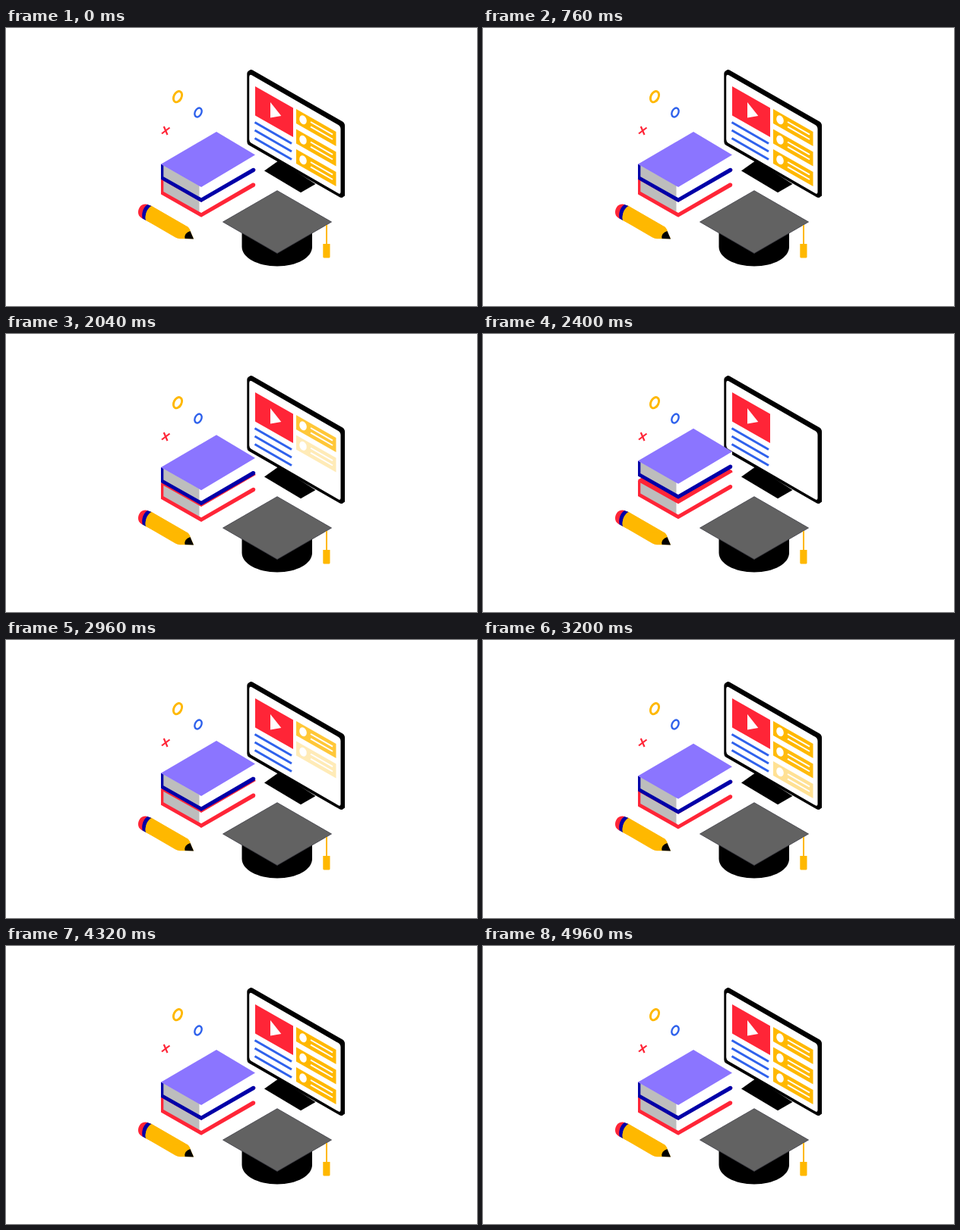
An HTML page for the animation above (5 s loop, 620x367 px).

```html
<!DOCTYPE html>
<html lang="en">
<head>
<meta charset="utf-8">
<title>Online learning</title>
<style>
html, body { margin: 0; width: 100%; height: 100%; overflow: hidden; background: #fff; }
svg { display: block; width: 100%; height: 100%; }
.yellow { fill: #ffb800; }
.red { fill: #ff2537; }
.navy { fill: #0000a8; }
.purple { fill: #8b75ff; }
.gray { fill: #bdbdbd; }
.white { fill: #fff; }
.line { fill: none; }
</style>
</head>
<body>
<svg viewBox="0 0 620 367">
  <defs>
    <g id="card">
      <path class="yellow" d="M382 107L434.500 137V156L382 126Z"/>
      <ellipse class="white" cx="391" cy="121.300" rx="4.500" ry="6.200" transform="rotate(-22 391 121.300)"/>
      <path class="line" stroke="#fff" stroke-width="2" d="M401 124L430 140.700M401 130.300L430 147"/>
    </g>
    <g id="pages">
      <path class="white" d="M206 180L257 209L328 167V187L257 228L206 199Z"/>
      <path class="gray" d="M207 181L254.500 208V226L207 199Z"/>
    </g>
    <path id="cover" d="M204 179.500L207.300 181.500V196.300L257 224.300L324.500 184.900Q328 184 328.300 187.500L327.500 189.500L257 230L204 199.800Z"/>
  </defs>

  <g id="monitor">
    <path d="M340 188.500L359 175L407.500 206L388 217.300Z"/>
    <path d="M317.300 60Q317.300 57.500 319.500 56.500L322 55L324 55.300L443 123.500Q446 125.500 446 129V221.500L442.500 224L440 223.800L319.500 154.500Q317.300 153 317.300 150Z"/>
    <path class="white" d="M320.200 64.500Q320.200 60.500 323.500 62.200L437.500 128Q440.500 130 440.500 133.500V216.500Q440.500 220 437.500 218.300L322.700 151.700Q320.200 150 320.200 147Z"/>
    <path class="red" d="M328 77L378 105.500V144L328 115.500Z"/>
    <path class="white" d="M348 98L362.300 116L348 118.500Z"/>
    <path class="line" stroke="#2f62ec" stroke-width="3" d="M327.500 124.500L376 152.500M327.500 135L376 163M327.500 145.500L376 173.500"/>
    <use class="card" href="#card"/>
    <use class="card" href="#card" y="26.500"/>
    <use class="card" href="#card" y="53"/>
  </g>

  <g id="lower">
    <path class="red" d="M204 198L277 156L328 186L257 227.500Z"/>
    <use href="#pages" y="20"/>
    <use class="red" href="#cover" y="19.700"/>
    <path class="line" stroke="#ff2537" stroke-width="3" d="M204.500 198.500L257 228L328 186.500"/>
  </g>
  <g id="upper">
    <use href="#pages"/>
    <use class="navy" href="#cover"/>
    <path class="purple" d="M204 179.700L277 137L328 167.500L257 210Z"/>
  </g>

  <g id="cap">
    <path d="M310.500 268V289C310.500 303 331 314.500 357 314.500S403 303 403 289V268Z"/>
    <path fill="#626262" stroke="#3c3c44" stroke-width=".8" d="M285.500 256L357 214.700L428.500 256L357 297.500Z"/>
    <path class="yellow" d="M421 260H423V285H426.500V302Q426.500 303.500 425 303.500H419Q417.300 303.500 417.300 302V285H421Z"/>
  </g>

  <g id="pencil">
    <path class="yellow" d="M188 234H190L240 263Q242 265 243 269L247 278.300H229Q226 278 223 276.500L181 252Z"/>
    <path d="M247 278.500L235.500 278Q234 271 242.500 268Z"/>
    <path class="red" d="M187 233C180 230.500 174 236 174 243C174 248 177 250.500 181 252Z"/>
    <path class="navy" d="M186.500 233L192 235.200C186 238 182.500 246 184 254L179.700 251.500C178 244 181 236 186.500 233Z"/>
    <path class="yellow" d="M191.500 235L240 263L200 262L184 254C182.500 246 186 238 191.500 235Z"/>
  </g>

  <g class="line">
    <ellipse cx="226" cy="90.700" rx="5" ry="7.600" stroke="#ffb800" stroke-width="2.900" transform="rotate(27 226 90.700)"/>
    <ellipse cx="253" cy="111.500" rx="4.200" ry="6.300" stroke="#2f62ec" stroke-width="2.400" transform="rotate(25 253 111.500)"/>
    <path stroke="#ff2537" stroke-width="2.200" d="M205 139.500L215.500 131.500M207.800 130L212.500 141"/>
  </g>
</svg>
<script>
const LOOP = 5000, STEP = 40, FADE = 360;
const fades = [[1960, 2680], [1780, 2860], [1590, 3050]];
const lift = { start: 1780, peak: 2480, end: 3260 };

const cards = document.querySelectorAll(".card");
const upper = document.getElementById("upper");
const lower = document.getElementById("lower");

const ramp = (t, from, to) => Math.min(1, Math.max(0, (t - from) / (to - from)));
const ease = p => (1 - Math.cos(Math.PI * p)) / 2;

function draw(t) {
  cards.forEach((card, i) => {
    const [out, back] = fades[i];
    card.setAttribute("opacity", 1 - ramp(t, out, out + FADE) + ramp(t, back, back + FADE));
  });
  const rise = ease(ramp(t, lift.start, lift.peak)) - ease(ramp(t, lift.peak, lift.end));
  upper.setAttribute("transform", `translate(0 ${-12.6 * rise})`);
  lower.setAttribute("transform", `translate(0 ${-5.6 * rise})`);
}

const began = performance.now();
function tick() {
  const t = (performance.now() - began) % LOOP;
  draw(Math.floor(t / STEP) * STEP);
  requestAnimationFrame(tick);
}
tick();
</script>
</body>
</html>
```
